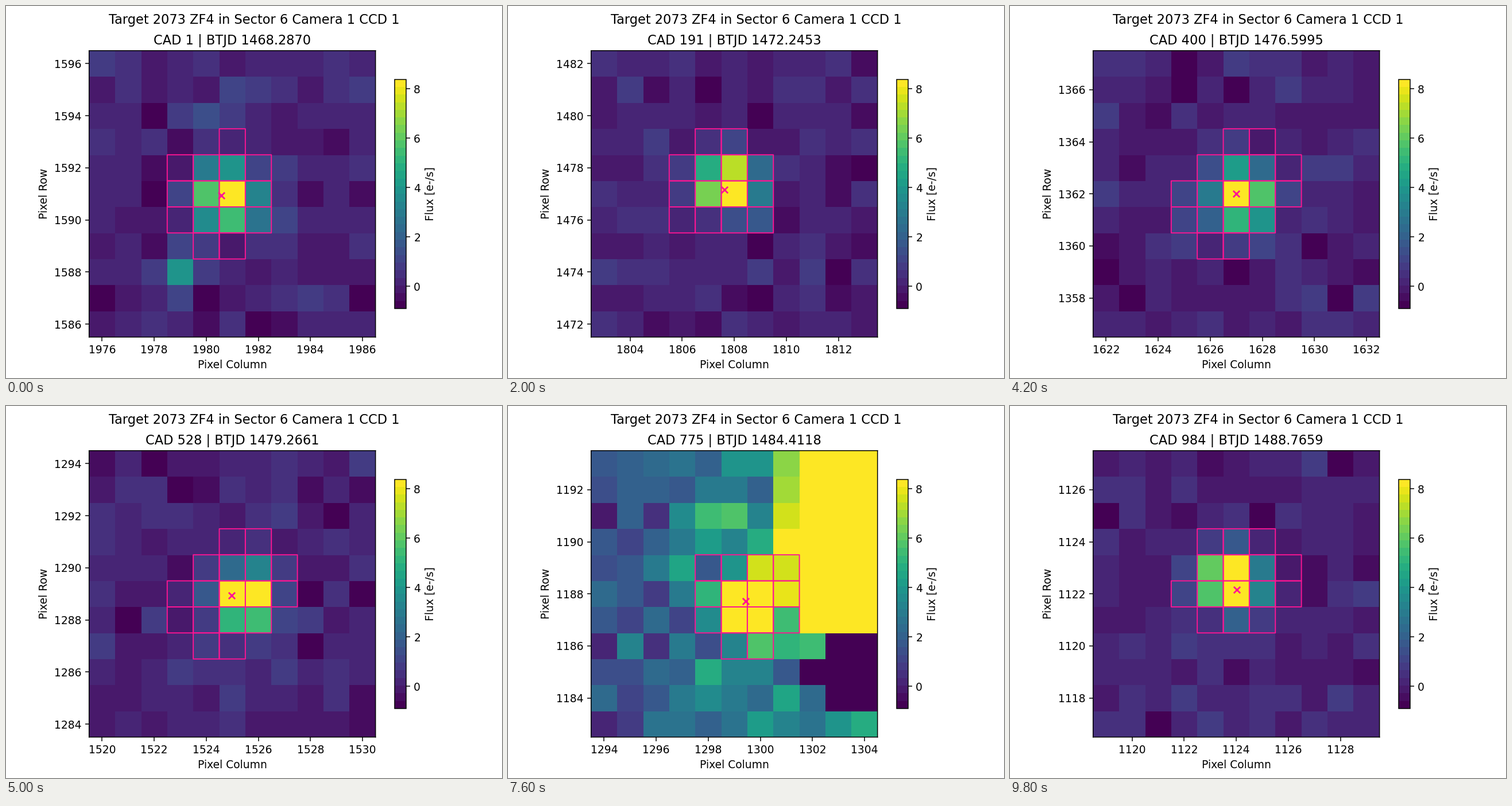
Animation of 864x648 px, one loop 10000 ms. Source, as a matplotlib script:

```python
import numpy as np
import matplotlib.pyplot as plt
from matplotlib.animation import FuncAnimation
from matplotlib.collections import PolyCollection
from matplotlib.ticker import MultipleLocator

FRAMES, STEP_MS = 50, 200
SIZE, HALF = 11, 5
VMIN, VMAX = -0.9, 8.39
PEAK, REACH = 11, 4.655
PINK = "deeppink"

# way points: cadence, column, row, and how far the light sits from the marker
CAD, COL, ROW, DX, DY = np.array([
    (1, 1980.58, 1590.95, 0.26, -0.08),
    (191, 1807.62, 1477.17, 0.16, 0.18),
    (324, 1687.17, 1403.53, 0.08, -0.07),
    (528, 1524.97, 1288.94, 0.50, -0.10),
    (642, 1420.71, 1238.18, 0.20, 0.15),
    (775, 1299.44, 1187.71, 0.06, 0.00),
    (984, 1124.02, 1122.16, -0.26, 0.30),
]).T

# field stars: column, row, peak flux
STARS = [(1979, 1588, 3.6), (1980, 1594, 1.5), (1683, 1407, 2.1),
         (1416, 1240.7, 11), (1426, 1234, 3.3), (1424.5, 1234.6, 2)]


def cadence(k):
    """Every 19th cadence, with a downlink break between two orbits."""
    return 1 + 19 * k + (52 if k >= 23 else 0)


def btjd(cad):
    n = cad - 1
    return 1468.2870 + n / 48 - 2.7e-10 * n * n


def basis(cad):
    """Slow drift plus the parallax of an eccentric 13.7 day orbit."""
    cad = np.asarray(cad, float)
    ecc = 0.55
    m = 2 * np.pi * (cad - 445) / 658
    e = m + ecc * np.sin(m)
    for _ in range(8):
        e = e - (e - ecc * np.sin(e) - m) / (1 - ecc * np.cos(e))
    t = cad / 1000
    return np.stack([t ** 0, t, t * t, np.cos(e), np.sin(e)], axis=-1)


def make_track(values):
    design = basis(CAD)
    coef = np.linalg.lstsq(design, values, rcond=None)[0]
    rest = values - design @ coef
    return lambda cad: float(basis(cad) @ coef + np.interp(cad, CAD, rest))


track_col, track_row = make_track(COL), make_track(ROW)


def sigmoid(v):
    return 1 / (1 + np.exp(-v))


def blob(x, y, cx, cy, wx, wy):
    return np.exp(-(x - cx) ** 2 / wx - (y - cy) ** 2 / wy)


def glare(x, y):
    """Saturated star: a ramp, a bright block and a bleeding hole."""
    block = 10 * sigmoid(2 * (x - 1301.5)) * sigmoid(3 * (y - 1185.7))
    hole = 25 * blob(x, y, 1304, 1185.2, 3, 1.4)
    return 1.6 + 0.3 * (x - 1294) + block - hole


def flux_window(k, cad, col, row, left, bottom):
    rng = np.random.default_rng(600 + k)
    x = left + np.arange(SIZE)
    y = bottom + np.arange(SIZE)[:, None]
    near = np.exp(-((x - 1300) / 8) ** 4)
    noise = np.clip(0.28 * rng.standard_t(3, (SIZE, SIZE)), -1.1, 0.8)
    flux = 0.12 + noise * (1 + 2 * near) + near * glare(x, y)
    cx = col + np.interp(cad, CAD, DX)
    cy = row + np.interp(cad, CAD, DY)
    flux += PEAK * blob(x, y, cx, cy, 1.2, 1.2)
    for sx, sy, peak in STARS:
        flux += peak * blob(x, y, sx, sy, 0.6, 0.6)
    return flux


def aperture(cad, col, row, left, bottom):
    """Unit squares inside a tilted ellipse around the target."""
    tilt = 0.05 + 0.13 * np.exp(-((cad - 440) / 220) ** 2)
    squares = []
    for x in range(left, left + SIZE):
        for y in range(bottom, bottom + SIZE):
            u, v = x - col, y - row
            if u * u + v * v - 2 * tilt * u * v < REACH:
                squares.append([(x - .5, y - .5), (x + .5, y - .5),
                                (x + .5, y + .5), (x - .5, y + .5)])
    return squares


fig, ax = plt.subplots(figsize=(6.4, 4.8), dpi=135)
fig.suptitle("Target 2073 ZF4 in Sector 6 Camera 1 CCD 1")
image = ax.imshow(np.zeros((SIZE, SIZE)), origin="lower", vmin=VMIN, vmax=VMAX,
                  cmap=plt.colormaps["viridis"].resampled(30))
fig.colorbar(image, ax=ax, shrink=0.8, label="Flux [e-/s]")
ax.set_xlabel("Pixel Column")
ax.set_ylabel("Pixel Row")
ax.xaxis.set_major_locator(MultipleLocator(2))
ax.yaxis.set_major_locator(MultipleLocator(2))
for spine in ax.spines.values():
    spine.set_snap(False)
title = ax.set_title("")
mask = PolyCollection([], facecolors="none", edgecolors=PINK, linewidths=1,
                      snap=False, zorder=2)
ax.add_collection(mask, autolim=False)
marker = ax.scatter([0], [0], marker="x", color=PINK, zorder=3)


def update(k):
    cad = cadence(k)
    col, row = track_col(cad), track_row(cad)
    left, bottom = round(col) - HALF, round(row) - HALF
    box = (left - .5, left + SIZE - .5, bottom - .5, bottom + SIZE - .5)
    image.set_data(flux_window(k, cad, col, row, left, bottom))
    image.set_extent(box)
    ax.set_xlim(box[:2])
    ax.set_ylim(box[2:])
    mask.set_verts(aperture(cad, col, row, left, bottom))
    marker.set_offsets([(col, row)])
    title.set_text(f"CAD {cad} | BTJD {btjd(cad):.4f}")
    return image, mask, marker, title


anim = FuncAnimation(fig, update, frames=FRAMES, interval=STEP_MS,
                     repeat=True, repeat_delay=0, blit=False)
plt.show()
```
